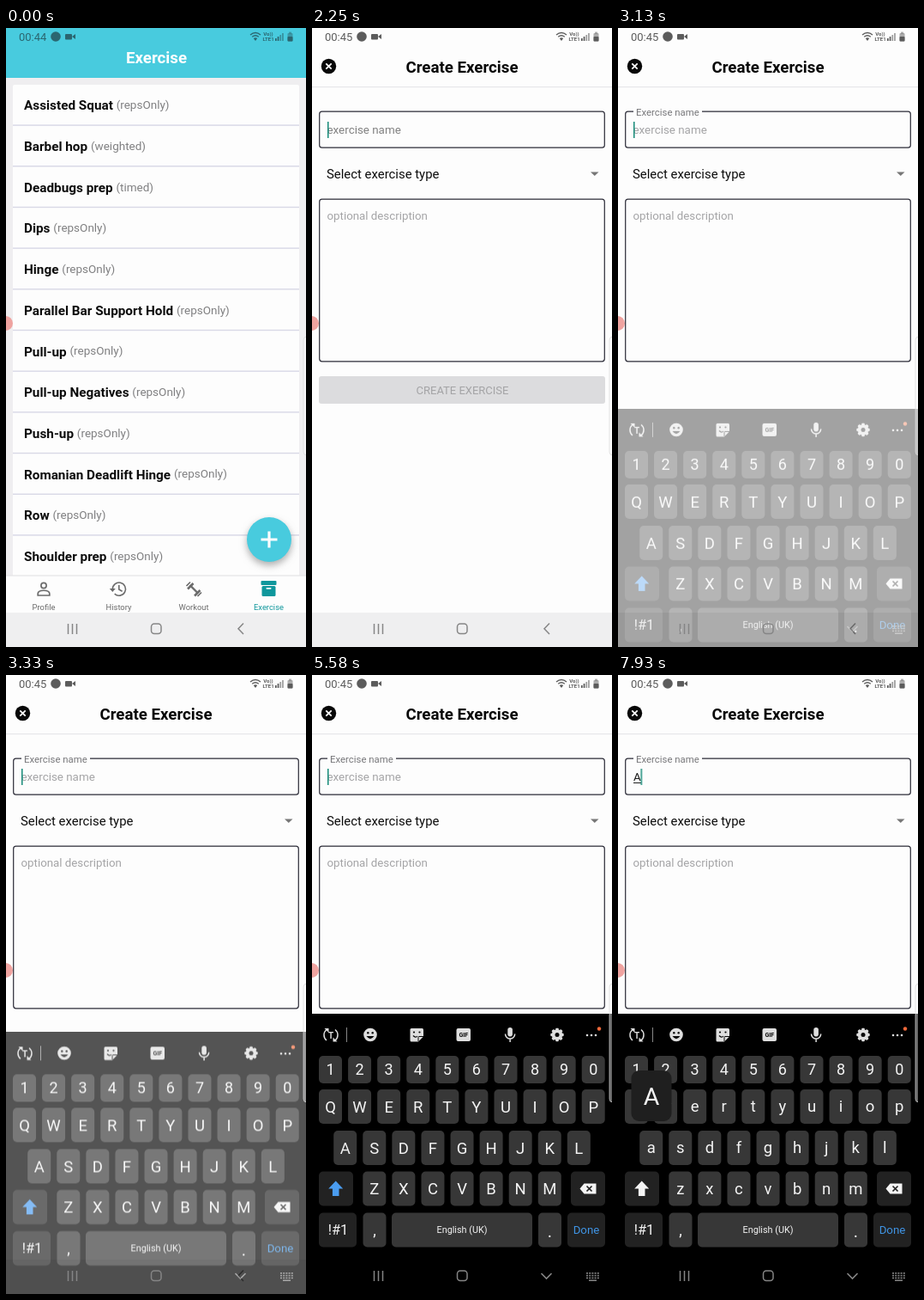
Recreate the animation shown at these times as an HTML page. Size 350 by 720 pixels, loop 8000 ms.

```html
<!DOCTYPE html>
<html lang="en">
<head>
<meta charset="utf-8">
<title>Create exercise</title>
<style>
html, body { margin: 0; width: 100%; height: 100%; overflow: hidden; background: #fdfdfd; }
svg { display: block; width: 100vw; height: 100vh; }
text { font-family: Roboto, sans-serif; white-space: pre; }
.a { animation: 8s linear infinite both; }
.cut { animation-timing-function: step-end; }

.page { animation-name: page; }
@keyframes page {
  0%, 3.1% { opacity: 0; transform: translateY(58px); animation-timing-function: ease-out; }
  7.5%, 100% { opacity: 1; transform: none; }
}
.old { animation-name: old; }
@keyframes old { 0% { opacity: 1; } 12.25%, 100% { opacity: 0; } }
.new { animation-name: new; }
@keyframes new { 0% { opacity: 0; } 12.25%, 100% { opacity: 1; } }

.hint { animation-name: hint; }
@keyframes hint {
  0%, 34.25% { fill: #808080; opacity: 1; }
  36.5% { fill: #a4a4a6; }
  95.49% { fill: #a4a4a6; opacity: 1; }
  95.5%, 100% { fill: #a4a4a6; opacity: 0; }
}
.label { animation-name: label; }
@keyframes label {
  0%, 34.25% { opacity: 0; transform: translateY(12px); }
  36.5%, 100% { opacity: 1; transform: none; }
}
.button { animation-name: button; }
@keyframes button { 0% { opacity: 1; } 35.5%, 100% { opacity: 0; } }

.caret { animation-name: caret; }
@keyframes caret {
  0%, 45.25%, 63.625%, 75.875%, 88.125% { opacity: 0; }
  23.25%, 57.5%, 69.75%, 82%, 94.25%, 100% { opacity: 1; }
}
.step { animation-name: step; }
@keyframes step { 0% { transform: none; } 95.5%, 100% { transform: translateX(8.5px); } }

.fade { animation-name: fade; }
@keyframes fade {
  0%, 35.75% { opacity: 0; }
  39.125% { opacity: .36; }
  41.625% { opacity: .67; }
  44.125%, 100% { opacity: 1; }
}
.rise { animation-name: rise; }
@keyframes rise {
  0%, 35.75% { transform: translateY(92px); }
  39.125% { transform: translateY(49px); }
  41.625% { transform: translateY(21.5px); }
  44.125% { transform: translateY(4px); }
  45.25%, 100% { transform: none; }
}
.upper { animation-name: upper; }
@keyframes upper { 0% { opacity: 1; } 95.5%, 100% { opacity: 0; } }
.lower { animation-name: lower; }
@keyframes lower { 0% { opacity: 0; } 95.5%, 100% { opacity: 1; } }
.popup { animation-name: popup; }
@keyframes popup { 0% { opacity: 0; } 94.25%, 100% { opacity: 1; } }
</style>
</head>
<body>
<script>
const WHITE = '#fdfdfd', CYAN = '#48cbde', KEY = '#373737', DARK_KEY = '#222222', LIGHT = '#f4f4f4', HINT = '#a4a4a6';

// Text placed by the vertical middle of its capitals.
const text = (x, y, size, fill, str, extra = '') =>
  `<text x="${x}" y="${y + size * .355}" font-size="${size}" fill="${fill}" ${extra}>${str}</text>`;
const mid = (x, y, size, fill, str, extra = '') => text(x, y, size, fill, str, `text-anchor="middle" ${extra}`);
const box = (x, y, w, h, fill, r = 0, extra = '') =>
  `<rect x="${x}" y="${y}" width="${w}" height="${h}" rx="${r}" fill="${fill}" ${extra}/>`;
const dot = (x, y, r, fill, extra = '') => `<circle cx="${x}" cy="${y}" r="${r}" fill="${fill}" ${extra}/>`;
const line = (d, color, w = 1.4, extra = '') => `<path d="${d}" fill="none" stroke="${color}" stroke-width="${w}" ${extra}/>`;
const shape = (d, fill) => `<path d="${d}" fill="${fill}"/>`;
const group = (cls, body) => `<g class="a ${cls}">${body}</g>`;

const status = (color, clock) => clock + dot(58, 10, 5.8, color) +
  box(69, 7, 8, 6.5, color, 1) + shape('M77 10l4-3v6z', color) +
  line('M285 8q6-5 12 0M287.2 10.3q3.8-3 7.6 0', color) + shape('M288.8 12q2.2-1.6 4.4 0l-2.2 3z', color) +
  mid(306, 6.5, 6, color, 'Vo))', 'font-weight="700"') + mid(306, 13, 6, color, 'LTE1', 'font-weight="700"') +
  [0, 1, 2, 3].map(i => box(314 + i * 2.7, 12 - i * 2, 1.7, 3 + i * 2, color, 0, i > 1 ? 'opacity=".6"' : '')).join('') +
  box(328.5, 6, 6, 9.5, color, 1, 'opacity=".5"') + box(328.5, 10, 6, 5.5, color, 1) + box(330, 4.6, 3, 2, color, 0, 'opacity=".5"');

const navBase = color => line('M72.5 693v12M77.5 693v12M82.5 693v12', color, 1.5) +
  box(169.5, 693, 11.5, 11.5, 'none', 3.5, `stroke="${color}" stroke-width="1.5"`);

function listPage() {
  const names = ['Assisted Squat', 'Barbel hop', 'Deadbugs prep', 'Dips', 'Hinge', 'Parallel Bar Support Hold',
    'Pull-up', 'Pull-up Negatives', 'Push-up', 'Romanian Deadlift Hinge', 'Row', 'Shoulder prep'];
  const kinds = { 1: 'weighted', 2: 'timed' };
  const pitch = 47.68, gray = '#6b6b6b', teal = '#0f979c';
  const rows = names.map((name, i) => {
    const y = 90 + i * pitch;
    return text(21, y, 15.3, '#0c0c0c',
      `<tspan font-weight="700">${name} </tspan><tspan font-size="13.5" fill="#808082" dy="-1.2">(${kinds[i] || 'repsOnly'})</tspan>`) +
      box(8, y + 22.4, 334, 1.4, '#d8d8e6');
  }).join('');
  const icons =
    dot(44, 648.5, 3.1, 'none', `stroke="${gray}" stroke-width="1.7"`) +
    line('M37.2 660v-2c0-5 13.6-5 13.6 0v2z', gray, 1.7) +
    line('M124.3 653a7.6 7.6 0 1 1 2.4 5.2M131.8 648v5l3.8 2.2', gray, 1.6) + shape('M120.8 652h7l-3.5 4z', gray) +
    line('M214.5 648l9 9', gray, 2.4) + line('M212 652.5l6.5-6.5M220 660.5l6.5-6.5', gray, 2.6) +
    line('M210.5 649l4.5-4.5M223.5 661l4.5-4.5', gray, 1.7) +
    box(297.5, 643, 18, 5, teal, 1) + box(298.5, 649, 16, 12, teal, 1.5) + box(303.5, 651, 6, 1.8, WHITE, .8);
  const tabs = ['Profile', 'History', 'Workout', 'Exercise']
    .map((tab, i) => mid(44 + i * 87.5, 673.7, 9.4, i === 3 ? teal : gray, tab)).join('');
  return box(0, 0, 350, 720, '#efeef0') + box(8, 66, 334, 580, WHITE, 2) + rows +
    box(0, 0, 350, 58, CYAN) + status('#2b6670', text(15, 10, 13, '#2b6670', '00:44')) +
    mid(175.5, 34, 18.7, WHITE, 'Exercise', 'font-weight="700"') +
    dot(307, 595, 26, CYAN, 'style="filter:drop-shadow(0 4px 4px #66666688)"') +
    line('M307 585.5v19M297.5 595h19', WHITE, 3.2) +
    box(0, 637, 350, 43, WHITE) + box(0, 636.5, 350, 1, '#e2e2e4') + icons + tabs;
}

function formPage() {
  const gray = '#5c5c5c', outline = 'stroke="#2a2a36" stroke-width="1.2"';
  const clock = group('old cut', text(15, 10, 13, gray, '00:44')) + group('new cut', text(15, 10, 13, gray, '00:45'));
  return box(0, 0, 350, 680, WHITE) + status(gray, clock) +
    dot(19.5, 44.5, 8.7, '#080808') + line('M16.3 41.3l6.4 6.4M22.7 41.3l-6.4 6.4', WHITE, 1.8) +
    mid(175, 45, 18.7, '#080808', 'Create Exercise', 'font-weight="700"') +
    box(0, 68, 350, 1.2, '#e6e6ea') +
    box(8.7, 97.2, 332.6, 42, WHITE, 3, outline) +
    group('label', box(18, 94, 80, 7, WHITE) + text(21, 97.5, 11.4, '#77777a', 'Exercise name')) +
    text(17.5, 118.5, 13.4, '', 'exercise name', 'class="a hint"') +
    group('lower cut', text(18, 118.5, 13.4, '#202020', 'A') + box(18, 125, 9, 1, '#202020')) +
    group('step cut', box(18, 109, 1.5, 19, '#158a78', 0, 'class="a caret cut"')) +
    text(17, 170, 14.9, '#0c0c0c', 'Select exercise type') + shape('M325 167.5h9.5l-4.75 4.5z', '#777777') +
    box(8.7, 199.2, 332.6, 188.6, WHITE, 3, outline) +
    text(17.5, 218, 13.3, HINT, 'optional description') +
    group('button cut', box(8, 405, 334, 32, '#dcdcde', 3) + mid(175.5, 421.5, 13, HINT, 'CREATE EXERCISE'));
}

function toolbar() {
  const c = '#dedede', k = '#080808';
  const teeth = Array.from({ length: 8 }, (_, i) =>
    box(284.2, 410.8, 3.6, 4, c, 1, `transform="rotate(${i * 45} 286 418.5)"`)).join('');
  return line('M17 425a8 8 0 0 1 0-12.5M27 412.5a8 8 0 0 1 0 12.5', c, 1.5) +
    shape('M14.5 411h5v5zM29.5 426.5h-5v-5z', c) + mid(22, 419, 10, c, 'T', 'font-weight="700"') +
    box(40, 410, 1, 17, '#888888') +
    dot(68, 418.5, 7.8, c) + dot(65.3, 416.3, 1.2, k) + dot(70.7, 416.3, 1.2, k) + shape('M63.5 420h9q-4.5 6.5-9 0z', k) +
    shape('M116 411h12.5q1.5 0 1.5 1.5v8l-6 6h-8q-1.5 0-1.5-1.5v-12.5q0-1.5 1.5-1.5z', c) +
    line('M124 426v-4.5q0-1 1-1h5', k, 1) + dot(119, 415.5, 1.1, k) + dot(125.5, 415.5, 1.1, k) +
    line('M118 419.5q3 3 5 .5', k, 1.2) +
    box(168.5, 411, 16.5, 15, c, 2) + mid(176.8, 418.5, 7, k, 'GIF', 'font-weight="700"') +
    box(228.3, 410, 5.6, 10.5, c, 2.8) + line('M225.5 417.5a5.6 5.6 0 0 0 11.2 0M231.1 423v4', c, 1.5) +
    dot(286, 418.5, 6.2, c) + teeth + dot(286, 418.5, 2.5, k) +
    [321, 326, 331].map(x => dot(x, 419, 1.3, c)).join('') + dot(335, 411.5, 2.2, '#f0693a');
}

function keyboard() {
  const pitch = 34.08;
  const row = (chars, x, y, h, size, cased) => {
    const each = draw => [...chars].map((ch, i) => draw(ch, x + i * pitch)).join('');
    const glyphs = lower => each((ch, cx) => mid(cx, y + (lower ? -.5 : 0), size, LIGHT, lower ? ch.toLowerCase() : ch));
    return each((ch, cx) => box(cx - 13.5, y - h / 2, 27, h, KEY, 5)) +
      (cased ? group('upper cut', glyphs(false)) + group('lower cut', glyphs(true)) : glyphs(false));
  };
  const arrow = 'M27.7 588.5l8.5 9h-4.7v8.5h-7.6v-8.5h-4.7z';
  return box(0, 394, 350, 420, '#000') + toolbar() +
    row('1234567890', 21.5, 459, 32, 18) +
    row('QWERTYUIOP', 21.5, 502, 40, 18.5, true) +
    row('ASDFGHJKL', 38.7, 550, 40, 18.5, true) +
    row('ZXCVBNM', 72.8, 597.5, 40, 18.5, true) +
    box(8, 577.5, 40, 40, DARK_KEY, 5) +
    group('upper cut', shape(arrow, '#4a9cf0')) + group('lower cut', shape(arrow, LIGHT)) +
    box(302, 577.5, 40, 40, DARK_KEY, 5) +
    shape('M312.5 597.5l5-6h14v12h-14z', LIGHT) + line('M320.5 594.5l6 6M326.5 594.5l-6 6', DARK_KEY, 1.7) +
    box(8, 625.5, 44, 40, DARK_KEY, 5) + mid(30.5, 645.5, 16.5, LIGHT, '!#1') +
    box(59.5, 625.5, 27, 40, KEY, 5) + mid(73, 645.5, 18, LIGHT, ',') +
    box(93, 625.5, 164, 40, KEY, 5) + mid(175, 645.5, 10.8, LIGHT, 'English (UK)') +
    box(264, 625.5, 27, 40, KEY, 5) + mid(277.5, 647, 20, LIGHT, '.') +
    box(298, 625.5, 44, 40, DARK_KEY, 5) + mid(320, 645.5, 13.3, '#3f94e4', 'Done') +
    group('popup cut', box(15.5, 460, 47, 59, '#1f1f1f', 9) + mid(39, 490, 28.5, LIGHT, 'A'));
}

function keyboardNav() {
  const c = '#858585';
  const keys = Array.from({ length: 15 }, (_, i) => box(320 + i % 5 * 3.2, 695 + Math.floor(i / 5) * 2.8, 2, 1.6, c)).join('');
  return navBase(c) + line('M267.5 696l6 6 6-6', c, 1.6) + keys + box(323, 703.5, 9, 1.5, c);
}

document.body.innerHTML = `<svg viewBox="0 0 350 720" preserveAspectRatio="none">` +
  listPage() + group('page', formPage()) +
  box(0, 680, 350, 40, '#efeff0') + navBase('#868686') + line('M277 692.5l-6 6.3 6 6.3', '#868686', 1.5) +
  group('fade', group('rise', keyboard()) + keyboardNav()) +
  box(347, 359, 9, 138, '#ffffff', 4, 'fill-opacity=".4" stroke="#d6d6d8" stroke-opacity=".7"') +
  dot(-.5, 343.5, 8.5, '#efa3a0') + '</svg>';
</script>
</body>
</html>
```
